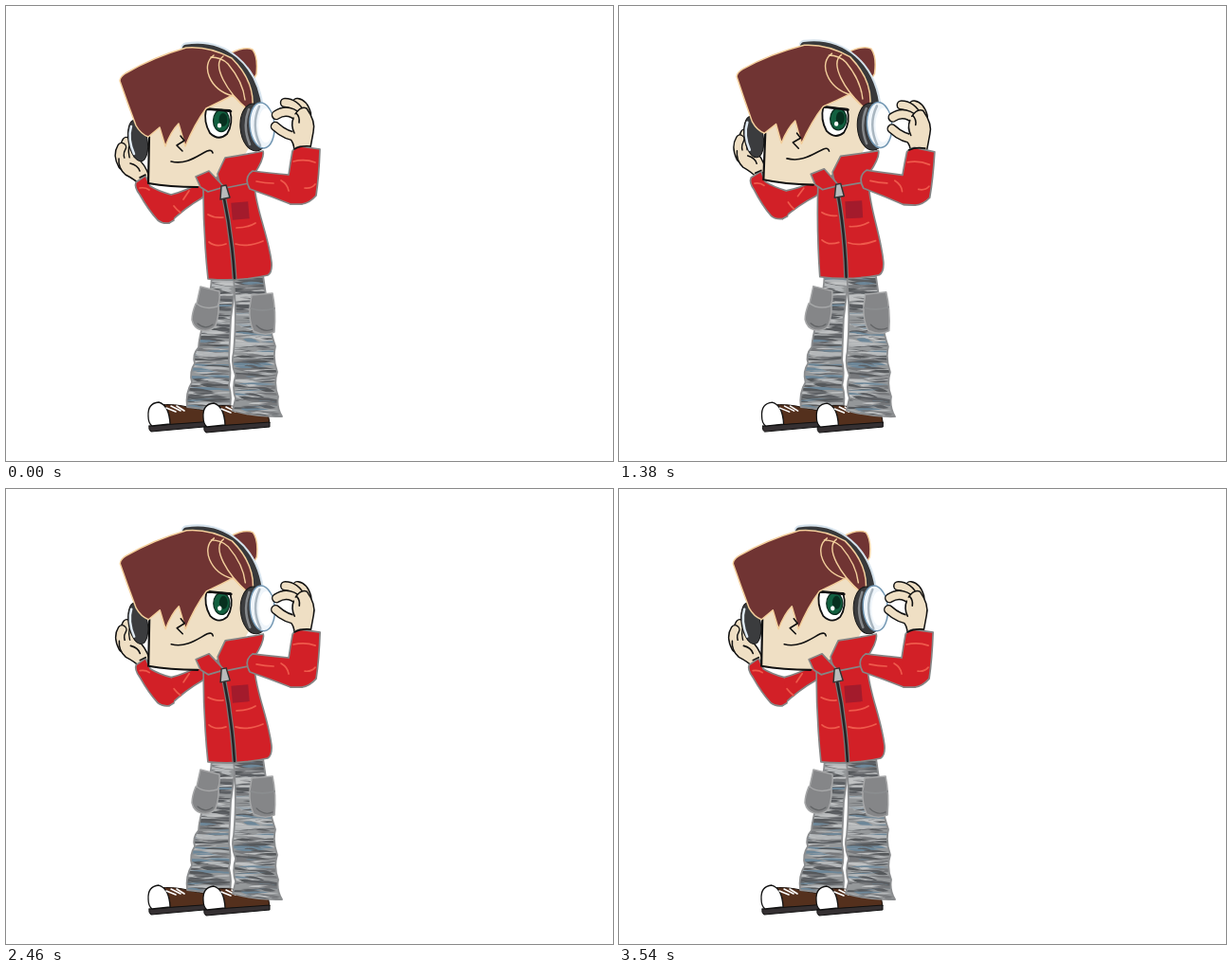
These frames come from a looping animation (640x480 px, 3570 ms). An HTML page:

```html
<!DOCTYPE html>
<html lang="en">
<head>
<meta charset="utf-8">
<title>Boy with headphones</title>
<style>
html, body { margin: 0; width: 100%; height: 100%; overflow: hidden; background: #fff; }
svg { display: block; width: 640px; height: 480px; }
path, ellipse { stroke-linejoin: round; stroke-linecap: round; }
.cloth { fill: #d22027; stroke: #858585; stroke-width: 1.7; }
.fold { fill: none; stroke: #ef5a4c; stroke-width: 1.7; }
.skin { fill: #efdfc4; stroke: #111; stroke-width: 1.5; }
.ink { fill: none; stroke: #111; stroke-width: 1.6; }
.hair { fill: #703433; stroke: #f3cf9c; stroke-width: 1.5; }
.lock { fill: none; stroke: #f3cf9c; stroke-width: 1.4; }
.denim { fill: #949799; }
.seam { fill: none; stroke: #8b8d8f; stroke-width: 1.8; }
.pocket { fill: #858688; stroke: #a6a7a8; stroke-width: 1.5; }
.pad { fill: #3b3c3e; stroke: #161616; stroke-width: 1; }
</style>
</head>
<body>
<svg id="stage" viewBox="0 0 640 480"></svg>
<script>
const p = (cls, d) => `<path class="${cls}" d="${d}"/>`;
const line = (color, width, d) =>
  `<path d="${d}" fill="none" stroke="${color}" stroke-width="${width}"/>`;
const oval = (x, y, rx, ry, attrs) =>
  `<ellipse cx="${x}" cy="${y}" rx="${rx}" ry="${ry}" ${attrs}/>`;
const finger = d => line('#111', 10.5, d) + line('#efdfc4', 7.6, d);

let seed = 11;
const rand = () => (seed = (seed * 16807) % 2147483647) / 2147483647;
const pick = list => list[Math.floor(rand() * list.length)];

// Crumpled fabric: thin slanted lens shapes clipped to the leg.
function leg(id, outline, left, width) {
  let streaks = '';
  for (let i = 0; i < 220; i++) {
    const y = 284 + i * 0.68;
    const x = left + rand() * width - 14;
    const len = 18 + rand() * 26;
    const dy = rand() * 7 - 2;
    const h = 1 + rand() * 2.2;
    const color = pick(['#6d8799', '#5c5f63', '#55585b', '#77797c', '#b3b6b8', '#c0c2c3']);
    streaks += `<path fill="${color}" d="M${x} ${y}q${len / 2} ${-h} ${len} ${dy}q${-len / 2} ${h} ${-len} ${-dy}z"/>`;
  }
  return `<clipPath id="${id}"><path d="${outline}"/></clipPath>` +
    p('denim', outline) + `<g clip-path="url(#${id})">${streaks}</g>` + p('seam', outline);
}

const shoe = x => `<g transform="translate(${x} ${x ? 1 : 0})">` +
  `<path fill="#54301d" stroke="#1c120d" d="M160 421Q178 419 195 424L218 428L220 439L165 442Z"/>` +
  `<path fill="#353032" stroke="#111" d="M151 443L220 438V443L153 449Q150 447 151 443Z"/>` +
  `<path fill="#fff" stroke="#111" stroke-width="1.3" d="M150 433Q149 419 161 418Q172 421 173 441L154 443Q150 440 150 433Z"/>` +
  line('#fff', 1.6, 'M169 424l10 4M174 422l10 5M180 422l8 5') + '</g>';

// Affine matrix that carries one triangle onto another.
function fit(a, b) {
  const [x, y, x1, y1, x2, y2] = a;
  const ux = x1 - x, uy = y1 - y, vx = x2 - x, vy = y2 - y;
  const det = ux * vy - uy * vx;
  const row = i => {
    const du = b[2 + i] - b[i], dv = b[4 + i] - b[i];
    const m = (du * vy - dv * uy) / det;
    const n = (dv * ux - du * vx) / det;
    return [m, n, b[i] - m * x - n * y];
  };
  const [r, s] = [row(0), row(1)];
  return [r[0], s[0], r[1], s[1], r[2], s[2]];
}

// Parts in paint order. Three anchors go from the left lean to the right lean;
// bow bends their way, for all anchors alike or for each one.
const stage = document.getElementById('stage');
const parts = [];
const part = (art, from, to, bow = [0]) => parts.push({
  art,
  end: fit(from, to),
  bend: fit(from, from.map((k, i) => k + bow[i % bow.length]))
});
const slide = (art, dx, dy) =>
  part(art, [0, 0, 1, 0, 0, 1], [dx, dy, dx + 1, dy, dx, dy + 1]);

// Left arm
part(
  finger('M134 168Q128 157 132 149') + finger('M128 168Q122 152 127 143') +
  finger('M123 168Q117 157 122 149') +
  p('skin', 'M119 161Q118 171 126 178Q136 183 143 190L151 180Q147 167 138 160') +
  p('ink', 'M131 166Q139 168 141 174'),
  [116, 153, 122, 140, 148, 180], [137, 125, 143, 111, 156, 156], [5, -8]);

part(
  p('cloth', 'M174 199Q190 195 203 187L214 192Q210 200 206 203Q190 212 172 229') +
  p('fold', 'M177 211Q180 215 184 218M187 204Q191 198 193 195'),
  [206, 190, 172, 229, 174, 199], [210, 187, 168, 210, 182, 182], [2, -3]);

part(
  p('cloth', 'M174 199Q160 195 152 190L147 179L137 186Q135 191 141 199Q150 215 160 226Q165 230 172 229L177 226') +
  p('ink', 'M141 181L147 178') + p('fold', 'M141 192Q147 191 151 194'),
  [137, 186, 172, 229, 174, 199], [145, 164, 168, 210, 182, 182], [2, -3]);

// Legs and shoes
slide(shoe(0), 3.8, 0.8);

part(
  leg('legL', 'M217 284C216 316 204 340 203 360Q196 368 199 377Q193 386 196 397Q189 408 191 423L235 428Q239 414 235 400Q238 388 235 374L237 330L241 300L246 284Z', 190, 45) +
  p('pocket', 'M200 314Q196 324 196 331Q198 340 206 342Q216 344 221 337Q225 325 224 314Z') +
  p('pocket', 'M205 296L225 301Q226 311 223 317Q210 321 201 314Z') +
  line('#626466', 1.2, 'M202 335Q210 342 218 336'),
  [217, 287, 190, 422, 238, 425], [215, 284, 195, 422, 241, 424]);

slide(shoe(58), 2, 0.5);

part(
  leg('legR', 'M240 284L241 303Q243 330 240 365Q237 378 242 390Q238 403 242 414L239 427Q265 434 291 433Q285 423 287 412Q282 399 286 386Q281 372 284 359Q280 347 279 340L271 284Z', 237, 46),
  [270, 285, 240, 428, 291, 433], [269, 287, 246, 425, 291, 434]);

part(
  p('pocket', 'M259 305L281 303Q285 322 283 344Q273 349 261 343Q256 332 257 318Z') +
  p('seam', 'M258 319Q270 323 283 319') + line('#626466', 1.2, 'M264 337Q272 345 281 341'),
  [259, 304, 281, 303, 283, 344], [258, 301, 281, 296, 290, 337], [1.5, -0.5]);

// Head
part(
  oval(139, 142, 10, 22, 'class="pad" transform="rotate(-10 139 142)"') +
  line('#dfe9f2', 2.5, 'M132 127Q128 140 135 156') +
  p('hair', 'M236 50Q252 42 260 46Q266 54 264 72L257 84Z') +
  `<path fill="#efdfc4" d="M151 120L150 188Q172 191 201 191L240 176L259 145L262 90L190 65Z"/>` +
  line('#111', 2.2, 'M151 138L150 187Q172 191 202 191') +
  line('#d5e2ec', 11, 'M190 44C228 38 262 63 267 112') +
  line('#38393b', 8.6, 'M190 45C228 39 261 63 266 112') +
  `<path fill="#fff" stroke="#111" stroke-width="1.8" d="M211 109L236 110Q240 124 233 135Q224 143 215 134Q208 122 211 109Z"/>` +
  oval(227, 121, 8.5, 11.5, 'fill="#126040" stroke="#0a2e20" stroke-width="1.3"') +
  oval(229, 120, 4.5, 7, 'fill="#07301f"') +
  oval(225, 126, 2.2, 2.6, 'fill="#fff"') +
  line('#111', 2.6, 'M209 108L237 111') +
  p('hair', 'M120 79Q120 75 126 71Q155 54 190 44Q214 42 238 55Q265 82 259 113Q248 104 239 94Q226 101 211 108Q199 124 189 148L182 124Q174 132 168 148L162 128Q156 133 150 138Q142 135 137 126Q128 102 120 79Z') +
  p('lock', 'M219 52C205 62 214 88 239 95M229 53C217 62 231 90 259 113M216 54Q227 54 234 61Q250 80 252 99') +
  p('ink', 'M184 137L188 142L180 147L186 153M174 164C190 168 202 158 212 153Q217 151 218 155') +
  oval(262, 128, 15, 25, 'class="pad" transform="rotate(-5 262 128)"') +
  line('#85888b', 2.5, 'M256 109Q249 127 257 146') +
  oval(270, 126, 13, 24, 'fill="#eff5fa" stroke="#7196b2" stroke-width="1.5" transform="rotate(-5 270 126)"') +
  line('#a9b6c0', 2.5, 'M267 106Q258 126 268 147') +
  oval(274, 126, 8, 18, 'fill="#fff"'),
  [120, 80, 262, 50, 150, 188], [159, 44, 300, 55, 165, 167], [-4, 2, 0, -3, 0, -1]);

// Jacket
part(
  p('cloth', 'M208 192Q208 240 213 288Q246 291 276 284Q281 281 280 270C276 240 264 216 262 190L258 178L226 178Z') +
  p('cloth', 'M231 160Q251 157 271 153Q273 160 262 177L256 187L231 192Q224 188 223 177Z') +
  p('cloth', 'M200 180L214 174L230 191L213 196L205 191Z') +
  p('fold', 'M213 220Q220 224 229 223M214 249Q221 255 232 251M242 251Q254 255 271 248M243 234Q255 234 263 229') +
  line('#777', 5, 'M229 198C235 226 239 255 241 287') +
  line('#242426', 2.6, 'M229 198C235 226 239 255 241 287') +
  `<path fill="#b9babb" stroke="#333" stroke-width="1.5" d="M227 190L232 189L236 202L226 204Z"/>` +
  `<rect x="238" y="207" width="18" height="18" fill="#a31b2c" transform="rotate(-5 247 216)"/>`,
  [213, 288, 281, 280, 271, 153], [202, 280, 268, 286, 284, 157], [1, -2]);

// Right arm
part(
  p('cloth', 'M298 178Q275 176 260 174Q250 181 257 193Q280 201 300 209L312 209') +
  p('fold', 'M264 185Q273 187 282 187M290 184Q297 188 298 195'),
  [257, 193, 312, 209, 298, 178], [262, 198, 314, 226, 304, 190], [0, -3]);

slide(
  finger('M317 114Q314 103 307 102') + finger('M312 116Q305 102 294 102') +
  finger('M309 118Q297 107 285 115') + finger('M309 138Q296 138 284 127') +
  p('skin', 'M305 114Q311 105 317 108Q327 122 324 133L319 160L303 156Q305 148 301 142') +
  `<path fill="#efdfc4" d="M304 115L314 112L319 140L305 139Q301 128 304 115Z"/>` +
  p('ink', 'M303 118Q300 126 304 134M306 113Q310 117 309 123'),
  24, 16);

part(
  p('cloth', 'M298 178Q300 164 302 153Q305 149 310 148L331 151Q330 180 327 200Q320 208 312 209L300 209') +
  p('ink', 'M304 151Q311 147 321 148') +
  p('fold', 'M303 164Q315 161 326 165M315 192Q322 193 326 188'),
  [331, 150, 312, 209, 298, 178], [343, 178, 314, 226, 304, 190], [0, -3]);

stage.innerHTML = parts.map(({ art }) => `<g>${art}</g>`).join('');

const LOOP = 3570, SWAY = 1200, STEP = 30;
const IDENTITY = [1, 0, 0, 1, 0, 0];
const POWER = 2.4;
const ease = s => s < 0.5 ? (2 * s) ** POWER / 2 : 1 - (2 - 2 * s) ** POWER / 2;
const REACH = ease(0.8);

function draw(now) {
  const t = Math.floor((now % LOOP) / STEP) * STEP % SWAY;
  const v = ease(1 - Math.abs(1 - 2 * t / SWAY));
  const u = v / REACH;
  const arc = 4 * v * (1 - v);
  parts.forEach(({ end, bend }, n) => {
    const m = IDENTITY.map((k, i) => k + (end[i] - k) * u + (bend[i] - k) * arc);
    stage.children[n].setAttribute('transform', `matrix(${m.map(k => k.toFixed(4)).join(' ')})`);
  });
}

const start = performance.now();
function tick() {
  draw(performance.now() - start);
  requestAnimationFrame(tick);
}
tick();
</script>
</body>
</html>
```
